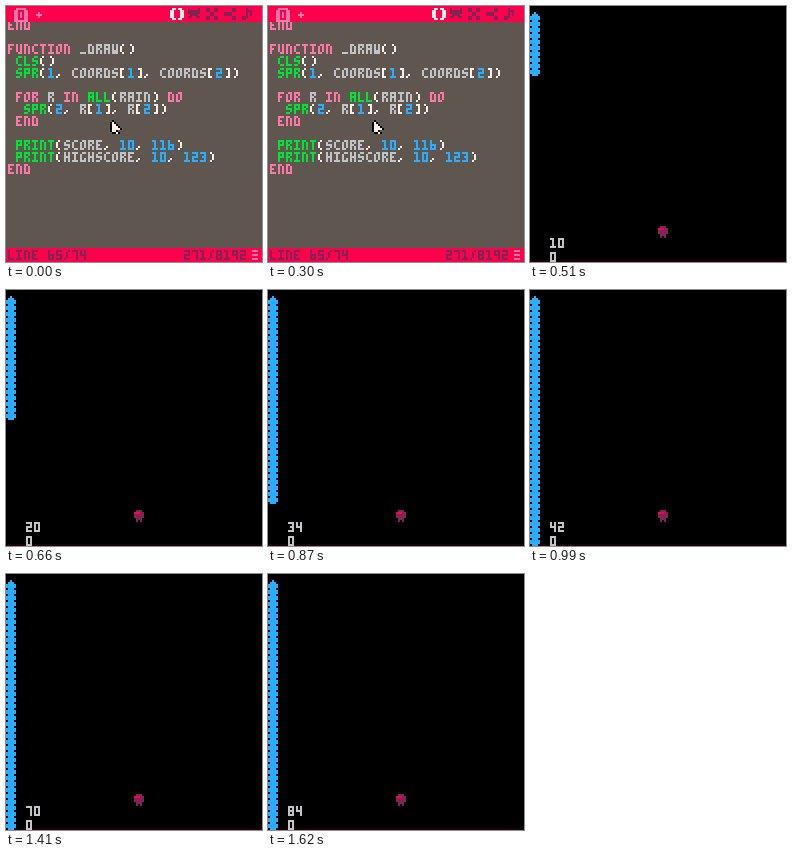
An HTML page with a canvas that plays this animation: 256 px wide and 256 px high, repeating every 1.65 s.

```html
<!DOCTYPE html>
<html lang="en">
<head>
<meta charset="utf-8">
<title>Rain game</title>
<style>
html, body { margin: 0; width: 100%; height: 100%; overflow: hidden; background: #000; }
canvas { display: block; width: 256px; height: 256px; }
</style>
</head>
<body>
<canvas id="stage" width="256" height="256"></canvas>
<script>
const ctx = document.getElementById('stage').getContext('2d');
ctx.scale(2, 2); // work on a 128 x 128 grid

const BLACK = '#000', PLUM = '#7e2553', BROWN = '#5f574f', GREY = '#c2c3c7', WHITE = '#fff1e8',
  RED = '#ff004d', GREEN = '#00e436', BLUE = '#29adff', PINK = '#ff77a8';

// Pen strokes: each stroke is a run of xy pairs
const glyphs = {
  A: '04002024 0222', C: '201001031424', D: '040010212404', E: '20000424 0212', F: '200004 0212',
  G: '201001042423', H: '0004 2024 0222', I: '0020 1014 0424', L: '000424', N: '0400102124',
  O: '20100104142320', P: '0400202202', R: '04002021122324 0212', S: '2010010222231404',
  T: '0020 1014', U: '0003142420', W: '00042420 0323',
  0: '0004242000', 1: '001014 0424', 2: '002022020424', 3: '00202404 1222', 4: '000222 2024',
  5: '200002222404', 6: '0004242202', 7: '002024', 8: '0004242000 0222', 9: '2202002024',
  '(': '10010314', ')': '10212314', '[': '10000414', ']': '10202414',
  ',': '1304', '_': '0424', '/': '20111304', '+': '1113 0222'
};

const icons = [
  '20101525 0104 40505545 6164',
  '0001 5051 0151 0252 1343 0414 4454',
  '0010 0111 4050 4151 0414 0515 4454 4555 2232 2333',
  '4050 4151 4454 4555 0203 1213 4113 1244',
  '2024 1415 0405 2042 4143'
];

const code = `END

FUNCTION _DRAW()
 CLS()
 SPR(1, COORDS[1], COORDS[2])

 FOR R IN ALL(RAIN) DO
  SPR(2, R[1], R[2])
 END

 PRINT(SCORE, 10, 116)
 PRINT(HIGHSCORE, 10, 123)
END`.split('\n');

function rect(x, y, w, h, color) {
  ctx.fillStyle = color;
  ctx.fillRect(x, y, w, h);
}

function draw(strokes, x, y, color) {
  ctx.fillStyle = color;
  for (const stroke of strokes.split(' ')) {
    const points = stroke.match(/../g).map(p => [+p[0], +p[1]]);
    points.forEach(([bx, by], i) => {
      const [ax, ay] = points[Math.max(i - 1, 0)];
      const steps = Math.max(Math.abs(bx - ax), Math.abs(by - ay)) || 1;
      for (let s = 0; s <= steps; s++) {
        const k = s / steps;
        ctx.fillRect(x + Math.round(ax + (bx - ax) * k), y + Math.round(ay + (by - ay) * k), 1, 1);
      }
    });
  }
}

function print(text, x, y, color) {
  [...String(text)].forEach((c, i) => {
    if (glyphs[c]) draw(glyphs[c], x + i * 4, y, color);
  });
}

// Rows of centred bars, given as widths
function bars(widths, cx, y, color) {
  widths.forEach((w, i) => rect(cx - (w - 1) / 2, y + i, w, 1, color));
}

function tokenColor(token) {
  if (/^(END|FUNCTION|FOR|IN|DO)$/.test(token)) return PINK;
  if (/^(CLS|SPR|ALL|PRINT)$/.test(token)) return GREEN;
  if (/^\d/.test(token)) return BLUE;
  return /^\w/.test(token) ? GREY : WHITE;
}

function pointer(x, y) {
  [1, 2, 3, 4, 2].forEach((w, i) => {
    rect(x, y + 1 + i, w + 2, 1, BLACK);
    rect(x + 1, y + 1 + i, w, 1, WHITE);
  });
  rect(x + 1, y, 1, 1, BLACK);
  rect(x + 1, y + 6, 4, 1, BLACK);
  rect(x + 3, y + 6, 1, 1, WHITE);
}

function editor(caret) {
  rect(0, 0, 128, 128, BROWN);
  if (caret) rect(24, 30, 5, 6, RED);
  code.forEach((line, row) => {
    for (const m of line.matchAll(/\w+|\S/g))
      print(m[0], 1 + m.index * 4, 7 + row * 6, tokenColor(m[0]));
  });

  rect(0, 0, 128, 8, RED);
  rect(5, 1, 5, 1, PINK);
  rect(4, 2, 7, 6, PINK);
  print(0, 6, 2, RED);
  print('+', 15, 2, PINK);
  icons.forEach((icon, i) => draw(icon, 82 + i * 9, 1, i ? PLUM : WHITE));

  rect(0, 121, 128, 7, RED);
  print('LINE 65/74', 1, 122, PLUM);
  print('271/8192', 89, 122, PLUM);
  for (let y = 122; y < 127; y += 2) rect(123, y, 3, 1, PINK);
  pointer(52, 57);
}

function game(score) {
  rect(0, 0, 128, 128, BLACK);
  rect(0, 127, 128, 1, '#1c000a');
  bars([3, 5, 5, 5, 3], 66, 110, PLUM);
  draw('65 75 85', 58, 106, RED);
  draw('04 24', 65, 111, PLUM);
  for (let i = 1; i <= score; i++) bars([1, 3, 5, 5, 3], 2, i * 3, BLUE);
  print(score, 10, 116, GREY);
  print(0, 10, 123, GREY);
}

function frame(now) {
  const t = now % 1650;
  if (t < 390) editor(t >= 60 && t < 300);
  else game(2 * Math.floor((t - 360) / 30));
  requestAnimationFrame(frame);
}
frame(0);
</script>
</body>
</html>
```
